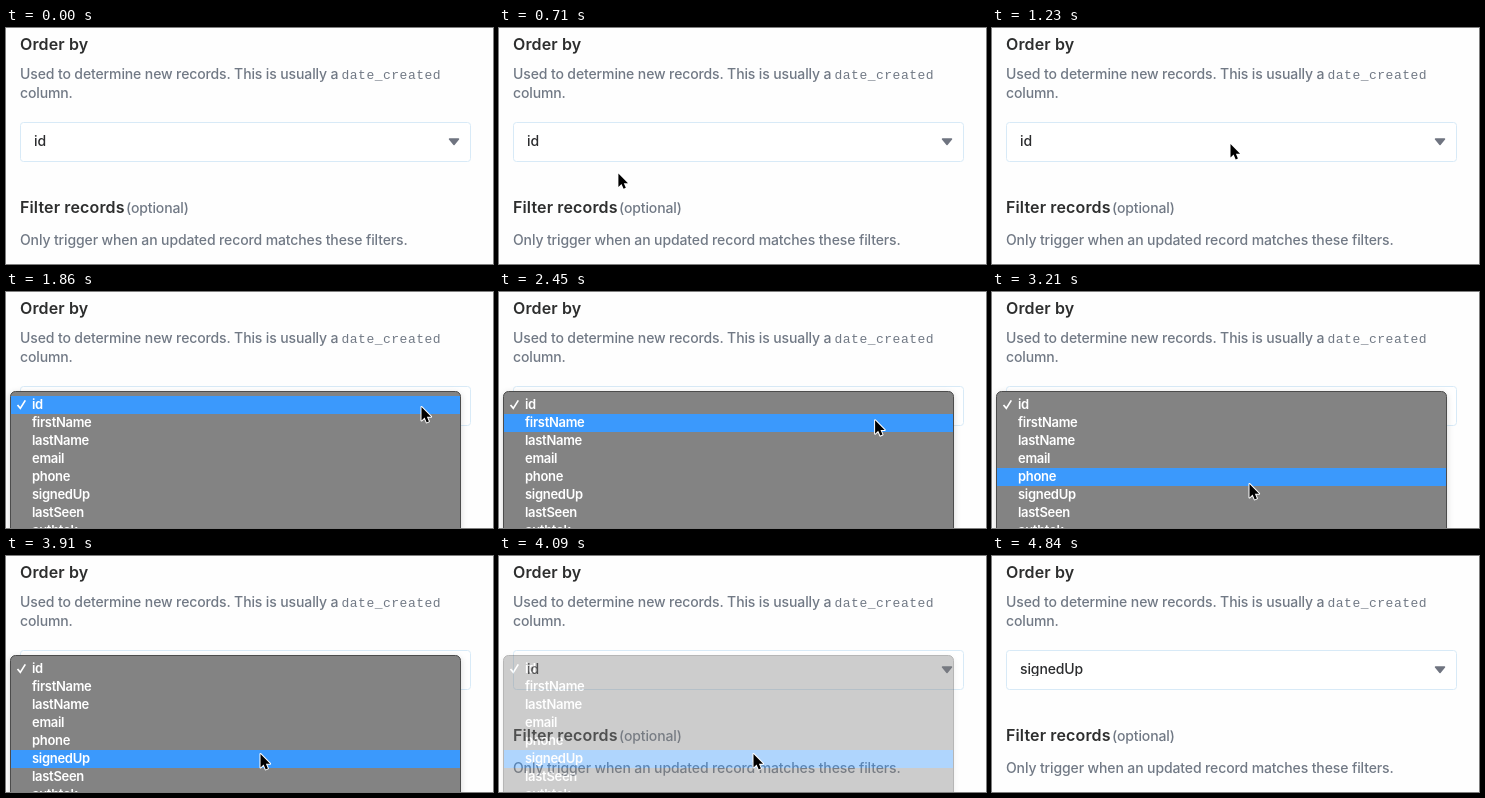
An HTML page that plays this animation: 487 px wide and 236 px high, repeating every 6.22 s.

```html
<!DOCTYPE html>
<html lang="en">
<head>
<meta charset="utf-8">
<title>Order by</title>
<style>
  html, body { margin: 0; width: 100%; height: 100%; overflow: hidden; background: #fefefe; }
  svg { display: block; width: 487px; height: 236px; }
  text { font: 500 14px Inter, sans-serif; letter-spacing: -.12px; fill: #717985; white-space: pre; }
  .title { font-size: 16px; font-weight: 600; letter-spacing: .14px; fill: #2d2e2e; }
  .code { font: 13px "Liberation Mono", monospace; letter-spacing: .5px; }
  .value { fill: #2b2c2e; }
  #menu { filter: drop-shadow(0 2px 3px rgba(0, 0, 0, .16)); }
  #menu text { font-size: 13px; font-weight: 600; letter-spacing: -.3px; fill: #fff; }
</style>
</head>
<body>
<svg viewBox="0 0 487 236">
  <clipPath id="line"><rect x="20" y="98" width="400" height="22"/></clipPath>

  <text class="title" x="14" y="22">Order by</text>
  <text x="14" y="51">Used to determine new records. This is usually a</text>
  <text class="code" x="335.5" y="51">date_created</text>
  <text x="14" y="70">column.</text>

  <rect x="14.5" y="94.5" width="450" height="39" rx="3" fill="#fff" stroke="#d8eaf7"/>
  <text class="value" id="value" x="28" y="118" clip-path="url(#line)">id</text>
  <path d="M443.500 111h9l-4.500 5.500z" fill="#6f7480" stroke="#6f7480" stroke-width="1.500" stroke-linejoin="round"/>

  <text class="title" x="14" y="185">Filter records</text>
  <text x="120" y="185">(optional)</text>
  <text x="14" y="217">Only trigger when an updated record matches these filters.</text>

  <g id="menu">
    <rect x="4.500" y="99.500" width="450" height="160" rx="5" fill="#838383" stroke="#4c4c4c"/>
    <rect id="highlight" x="5" width="449" height="18" fill="#3b99fc"/>
    <path d="M11.500 113l2.800 3.400 5-8" fill="none" stroke="#fff" stroke-width="1.700"/>
  </g>

  <path id="cursor" d="M0 0V13.500L3.100 10.600 5.200 15.400 7.400 14.400 5.400 9.800H9.600Z"
    fill="#000" stroke="#fff" stroke-width="2" stroke-linejoin="round" paint-order="stroke"/>
</svg>
<script>
  const LOOP = 6220, START = 459, TICK = 58.3;
  const ROW_TOP = 104, ROW_HEIGHT = 18;
  const OPEN = 24, BLINK = 58, CLOSE = 65, EXIT = 75;
  const FADE = { 61: .72, 62: .4, 63: .2, 64: .07 };

  const $ = id => document.getElementById(id);
  const value = $('value'), menu = $('menu'), highlight = $('highlight'), cursor = $('cursor');

  ['id', 'firstName', 'lastName', 'email', 'phone', 'signedUp', 'lastSeen', 'authtok'].forEach((name, i) => {
    const label = document.createElementNS('http://www.w3.org/2000/svg', 'text');
    label.setAttribute('x', 26);
    label.setAttribute('y', ROW_TOP + 13 + i * ROW_HEIGHT);
    label.textContent = name;
    menu.append(label);
  });

  const linear = u => u;
  const easeIn = power => u => u ** power;
  const easeOut = power => u => 1 - (1 - u) ** power;
  const easeInOut = u => .3 * u + .7 * u * u * (3 - 2 * u);

  // Pointer stops: tick, x, y, easing used to get there
  const stops = [
    [0, -2, 180, linear],
    [10, 215.5, 118, easeOut(1.6)],
    [13, 238.5, 116, linear],
    [22, 415.5, 115, easeInOut],
    [30, 415.5, 115, linear],
    [39, 302.5, 153, easeIn(1.3)],
    [41, 283.5, 169, linear],
    [47, 257.5, 192, easeOut(1.5)],
    [52, 254.5, 198, easeOut(1.3)],
    [67, 254.5, 198, linear],
    [EXIT, 280.5, 239, easeIn(1.4)]
  ];

  function pointerAt(tick) {
    const i = stops.findIndex(stop => stop[0] > tick);
    const [t0, x0, y0] = stops[i - 1], [t1, x1, y1, ease] = stops[i];
    const u = ease((tick - t0) / (t1 - t0));
    return [x0 + (x1 - x0) * u, y0 + (y1 - y0) * u];
  }

  const show = (node, on) => node.setAttribute('visibility', on ? 'visible' : 'hidden');

  function draw(now) {
    const tick = Math.floor((now % LOOP - START) / TICK);
    const moving = tick >= 0 && tick < EXIT;
    const open = tick >= OPEN && tick < CLOSE;

    show(cursor, moving);
    show(menu, open);
    show(highlight, open && tick !== BLINK);
    menu.style.opacity = FADE[tick] ?? 1;
    value.textContent = tick >= CLOSE ? 'signedUp' : 'id';

    if (moving) {
      const [x, y] = pointerAt(tick);
      cursor.setAttribute('transform', `translate(${x.toFixed(1)} ${y.toFixed(1)})`);
      const row = Math.max(0, Math.floor((y - ROW_TOP) / ROW_HEIGHT));
      highlight.setAttribute('y', ROW_TOP + row * ROW_HEIGHT);
    }
  }

  const origin = performance.now();
  function loop() {
    draw(performance.now() - origin);
    requestAnimationFrame(loop);
  }
  loop();
</script>
</body>
</html>
```
